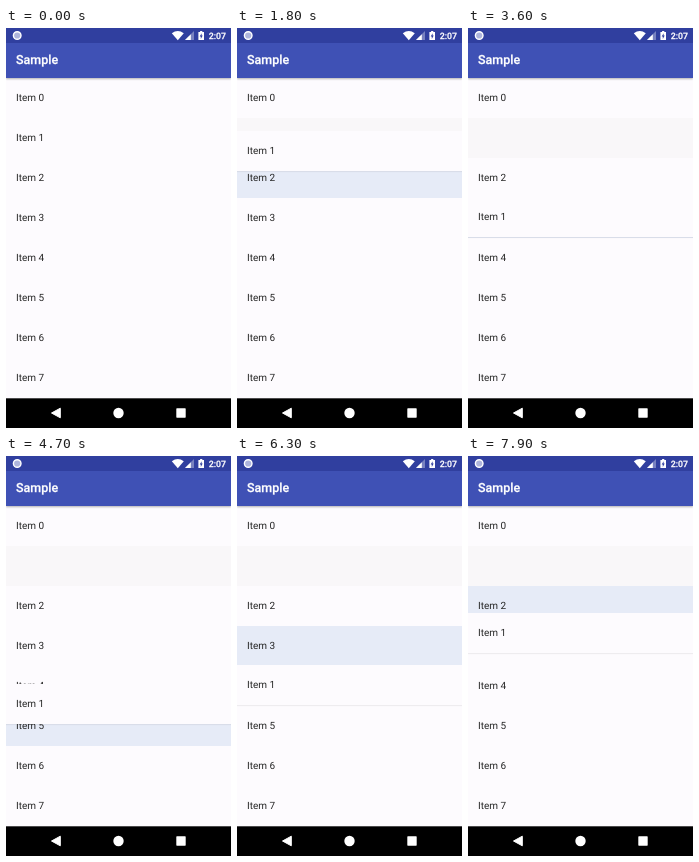
These frames come from a looping animation (225x400 px, 8000 ms). An HTML page:

```html
<!DOCTYPE html>
<html lang="en">
<head>
<meta charset="utf-8">
<title>Sample</title>
<style>
  html, body { margin: 0; width: 100%; height: 100%; overflow: hidden; }
  body { background: #fdfbfe; }
  #stage {
    position: relative; width: 225px; height: 400px; overflow: hidden;
    background: #fdfbfe; font-family: Roboto, sans-serif;
    text-rendering: geometricPrecision;
  }
  #stage > * { position: absolute; left: 0; width: 225px; }
  .row {
    box-sizing: border-box; height: 40px; padding-left: 10px;
    font-size: 10px; line-height: 42px; color: #262626; white-space: pre;
  }
  .row.over { background: #e6ebf7; }
  #gap { top: 90px; height: 40px; background: #f9f7f9; }
  #drag { background: #fdfbfe; }
  #drag.lifted { box-shadow: 0 1px 1px rgba(0, 0, 0, .06); }
  #bar {
    top: 15px; height: 35px; background: #3f51b5; color: #fff;
    font-size: 12.5px; font-weight: 500; line-height: 36px; text-indent: 10px;
    -webkit-text-stroke: .25px #fff;
    box-shadow: 0 1px 2px rgba(0, 0, 0, .3);
  }
  #status { top: 0; height: 15px; background: #303f9f; }
  #nav { top: 370px; height: 30px; }
  svg { display: block; }
</style>
</head>
<body>
<div id="stage">
  <div id="gap"></div>
  <div id="bar">Sample</div>
  <div id="status">
    <svg width="225" height="15" fill="#fff">
      <circle cx="11.2" cy="7.5" r="3.8" fill="#aeb5dc" stroke="#fff" stroke-width="1.4"/>
      <path d="M165.8 5.2Q171.8 1 177.8 5.2L171.8 12.2Z"/>
      <path d="M188 3V12H179Z" fill-opacity=".35"/>
      <path d="M184.8 6.2V12H179Z"/>
      <path d="M192.4 4h1.7V3h2.2v1h1.7v8h-5.6Z"/>
      <path d="M195.6 5.3v2.2h1.1l-1.9 3.4v-2.4h-1.1Z" fill="#303f9f"/>
      <text x="202.7" y="10.8" font-size="8.75" font-weight="500" stroke="#fff" stroke-width=".25">2:07</text>
    </svg>
  </div>
  <div id="nav">
    <svg width="225" height="30" fill="#fff">
      <rect y=".3" width="225" height="30" fill="#000"/>
      <path d="M45.5 15L54.3 10.2V19.8Z" stroke="#fff" stroke-linejoin="round"/>
      <circle cx="112.5" cy="15" r="5.2"/>
      <rect x="170.3" y="10.3" width="9.4" height="9.4" rx=".6"/>
    </svg>
  </div>
</div>
<script>
const LOOP = 8000, STEP = 100, TOP = 50, ROW = 40;
const LIFT = 800, HOVER = 1200, TURN = 5100;

// Turning points of the finger: time, row top, easing power of the way there.
const drags = [
  { t: LIFT, y: 90 },
  { t: TURN, y: 254, power: 1.7 },
  { t: 5300, y: 242 },
  { t: 5800, y: 216 },
  { t: 6300, y: 209 },
  { t: 7900, y: 157 }
];

const stage = document.getElementById('stage');
const bar = document.getElementById('bar');

const rows = Array.from({ length: 8 }, (_, i) => {
  const el = document.createElement('div');
  el.className = 'row';
  el.textContent = 'Item ' + i;
  el.style.top = TOP + i * ROW + 'px';
  return el;
});
const drag = rows[1];
drag.id = 'drag';
for (const el of rows) if (el !== drag) stage.insertBefore(el, bar);
stage.insertBefore(drag, bar);

function dragTop(t) {
  const k = drags.findIndex(d => d.t > t);
  if (k < 0) return drags[drags.length - 1].y;
  if (k === 0) return drags[0].y;
  const from = drags[k - 1], to = drags[k];
  const u = (t - from.t) / (to.t - from.t);
  return Math.floor(from.y + (to.y - from.y) * u ** (to.power || 1));
}

// The row under the leading edge is the drop target.
function dropTarget(t, y) {
  if (t < HOVER) return -1;
  const edge = t <= TURN ? y + ROW - 1 : y;
  return Math.floor((edge - TOP) / ROW);
}

function render(t) {
  const y = dragTop(t), target = dropTarget(t, y);
  drag.style.top = y + 'px';
  drag.classList.toggle('lifted', t >= LIFT);
  rows.forEach((el, i) => el.classList.toggle('over', el !== drag && i === target));
}

const start = performance.now();
function tick() {
  const t = (performance.now() - start) % LOOP;
  render(Math.floor(t / STEP) * STEP);
  requestAnimationFrame(tick);
}
tick();
</script>
</body>
</html>
```
